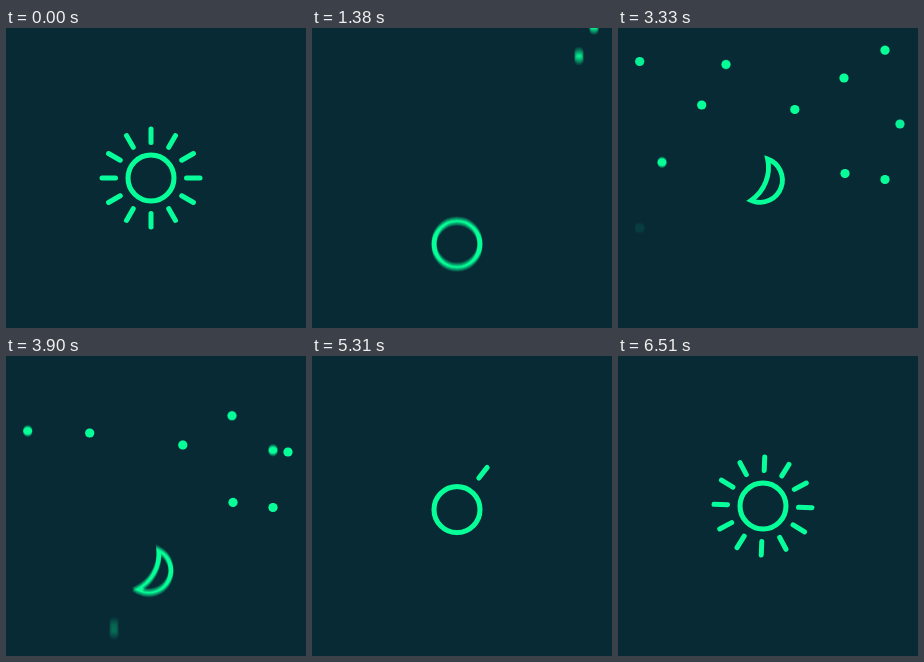
Write an HTML page with a canvas that moves like this. It is 300 by 300 pixels and loops after 6540 ms.

```html
<!DOCTYPE html>
<html lang="en">
<head>
<meta charset="utf-8">
<title>Day and night</title>
<style>
  html, body { margin: 0; width: 100%; height: 100%; overflow: hidden; background: #072a35; }
  canvas { display: block; width: 300px; height: 300px; }
</style>
</head>
<body>
<canvas id="stage"></canvas>
<script>
const SIZE = 300, LOOP = 6540, STEP = 30;
const SHUTTER = 18, SAMPLES = 9;
const BACK = '#072a35';
const GLOW = 'rgb(0, 212, 102)'; // added to the background gives the bright green

const canvas = document.getElementById('stage');
const ctx = canvas.getContext('2d');
const dpr = window.devicePixelRatio || 1;
canvas.width = canvas.height = SIZE * dpr;

// Resting place and time to fall 300 px, in the order of falling
const stars = [
  [267, 16, 1530], [21.7, 186, 960], [44, 121, 730], [108, 33.5, 750],
  [21.7, 33.5, 1300], [176.8, 81.5, 2076], [226, 50, 1318], [227, 145.5, 1900],
  [83.7, 77, 1500], [282, 96, 450], [267, 151.5, 574]
].map(([x, y, time], i, all) => ({
  x, y, time,
  enter: 1320 + 40 * (all.length - 1 - i),
  dim: 2184 + 164 * (7 * i % all.length),
  fall: 3020 + 38 * i ** 1.5
}));

const part = (t, from, length) => Math.max(0, Math.min(1, (t - from) / length));
const easeOut = u => 1 - (1 - u) ** 4;
const rad = deg => deg * Math.PI / 180;

function circle(x, y, r) {
  ctx.beginPath();
  ctx.arc(x, y, r, 0, Math.PI * 2);
}

function drawStar(star, t, weight) {
  if (t < star.enter) return;
  const y = -10 + (star.y + 10) * easeOut(part(t, star.enter, 920))
    + 300 * (Math.max(0, t - star.fall) / star.time) ** 2.43;
  if (y > SIZE + 10) return;
  ctx.globalAlpha = weight * (1 - 0.9 * Math.exp(-(((t - star.dim) / 100) ** 2)));
  circle(star.x, y, 4.6);
  ctx.fill();
}

function drawSun(t) {
  const y = t < 3000
    ? 150 + 178 * part(t, 917, 760) ** 2
    : 328 - 178 * easeOut(part(t, 4215, 1755));
  if (y > 327) return;
  ctx.lineWidth = 5;
  circle(145, y, 23);
  ctx.stroke();
}

function drawRays(t) {
  const leaving = t < 3000;
  const spin = leaving ? -0.034 * t : 38 - 0.03 * (t - 5310);
  ctx.lineWidth = 5;
  ctx.lineCap = 'round';
  for (let i = 0; i < 12; i++) {
    const shown = leaving ? t < 600 + 65 * i : t >= 5270 + 60 * i;
    if (!shown) continue;
    const a = rad(30 * i + spin);
    const dx = Math.sin(a), dy = -Math.cos(a);
    ctx.beginPath();
    ctx.moveTo(145 + 35.5 * dx, 150 + 35.5 * dy);
    ctx.lineTo(145 + 49 * dx, 150 + 49 * dy);
    ctx.stroke();
  }
}

function drawMoon(t) {
  if (t < 1500 || t > 4210) return;
  const rise = easeOut(part(t, 1500, 1956));
  const drop = part(t, 3450, 760) ** 2;
  const R = 22.3, inner = 40;
  const tip = rad(88);
  const bend = Math.asin(R * Math.sin(tip) / inner);
  const chord = -R * Math.cos(tip);
  ctx.save();
  ctx.translate(141.2 + (t - 2430) * 0.001, 330 - 178 * rise + 178 * drop);
  ctx.rotate(rad(10 + (t - 2430) * 0.013));
  ctx.lineWidth = 4.8;
  ctx.beginPath();
  ctx.arc(0, 0, R, tip - Math.PI, Math.PI - tip);
  ctx.arc(chord - inner * Math.cos(bend), 0, inner, bend, -bend, true);
  ctx.closePath();
  ctx.stroke();
  ctx.restore();
}

function draw(t) {
  ctx.setTransform(dpr, 0, 0, dpr, 0, 0);
  ctx.globalAlpha = 1;
  ctx.globalCompositeOperation = 'source-over';
  ctx.fillStyle = BACK;
  ctx.fillRect(0, 0, SIZE, SIZE);

  ctx.globalCompositeOperation = 'lighter';
  ctx.fillStyle = ctx.strokeStyle = GLOW;
  drawRays(t);

  // Motion blur: average several moments around t
  const weight = 1 / SAMPLES;
  for (let i = 0; i < SAMPLES; i++) {
    const at = t + SHUTTER * ((i + 0.5) / SAMPLES - 0.5);
    ctx.globalAlpha = weight;
    drawSun(at);
    drawMoon(at);
    for (const star of stars) drawStar(star, at, weight);
  }
}

const start = performance.now();
function tick() {
  const t = (performance.now() - start) % LOOP;
  draw(Math.floor(t / STEP) * STEP);
  requestAnimationFrame(tick);
}
draw(0);
requestAnimationFrame(tick);
</script>
</body>
</html>
```
